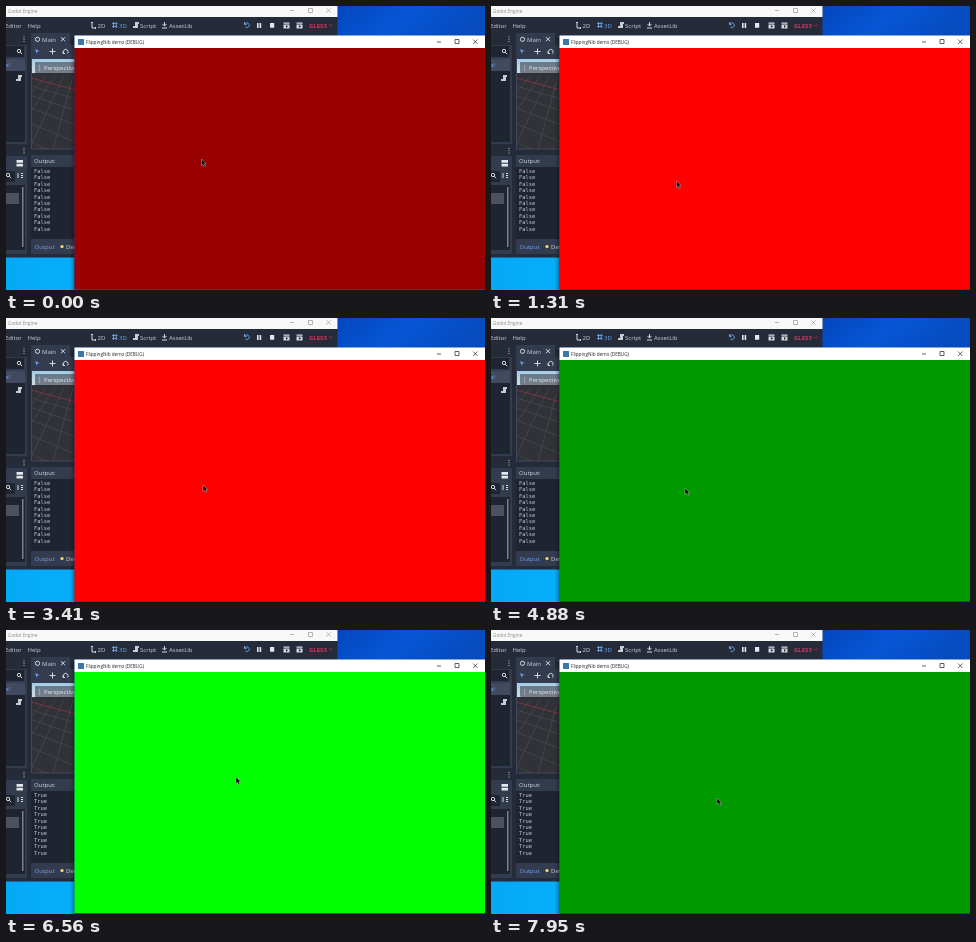
Animation of 479 by 284 pixels, one loop 8 s. Source, as an HTML page:

```html
<!DOCTYPE html>
<html lang="en">
<head>
<meta charset="utf-8">
<title>Pen demo</title>
<style>
html, body { margin: 0; width: 100%; height: 100%; overflow: hidden; background: #0757cf; }
svg { display: block; width: 479px; height: 284px; font: 6px "Noto Sans", sans-serif; fill: #c6cad3; }
.mono { font: 5.4px "DejaVu Sans Mono", monospace; }
.win { font: 4.65px "Open Sans", sans-serif; }
.line { fill: none; stroke: #d4d7de; stroke-width: 1; }
.blue { fill: #699ce8; }
.dark { fill: #1f2530; }
.thin { fill: none; stroke-width: .7; }
</style>
</head>
<body>
<svg viewBox="0 0 479 284">
  <defs>
    <linearGradient id="desk" x2="1" y2=".25">
      <stop stop-color="#0346bd"/><stop offset=".5" stop-color="#0756d5"/><stop offset="1" stop-color="#064bbf"/>
    </linearGradient>
    <linearGradient id="glow"><stop stop-color="#04a9f6"/><stop offset="1" stop-color="#06aefa"/></linearGradient>
    <linearGradient id="sky" x2="0" y2="1"><stop stop-color="#a3cbe6"/><stop offset="1" stop-color="#d3dde3"/></linearGradient>
    <linearGradient id="shade"><stop stop-color="#000" stop-opacity="0"/><stop offset="1" stop-color="#000" stop-opacity=".35"/></linearGradient>
    <clipPath id="view"><rect x="26" y="53" width="43" height="90"/></clipPath>
  </defs>
  <rect x="331" width="148" height="31" fill="url(#desk)"/>
  <rect y="250" width="70" height="34" fill="url(#glow)"/>

  <!-- editor window -->
  <rect width="331.500" height="251.500" fill="#252b38"/>
  <rect width="331.500" height="11" fill="#f8f8f9"/>
  <text class="win" x="2" y="6.600" fill="#888">Godot Engine</text>
  <path class="thin" stroke="#999" d="M284 4.500h4M302.500 2.500h4v4h-4zM320.500 2.500l4 4m0-4l-4 4"/>
  <text x="-1" y="21.500">Editor</text><text x="21.500" y="21.500">Help</text>
  <text x="91.500" y="21.500">2D</text><text class="blue" x="113" y="21.500">3D</text>
  <text x="134" y="21.500">Script</text><text x="163" y="21.500">AssetLib</text>
  <path class="line" d="M86 16v6h4M85 17l1-1 1 1M89 21l1 1-1 1M158.500 16v4M156.500 18l2 2 2-2M156 22h5"/>
  <path class="line" style="stroke:#699ce8" d="M106 17.500h5.500M106 20.500h5.500M107.500 16v6M110.200 16v6"/>
  <path d="M129 16h4v2h-1v4h-5v-2h2z"/>
  <path class="line" style="stroke:#699ce8" d="M239 18a2.300 2.300 0 1 1 .5 3M238.500 16v2.500h2"/>
  <path fill="#e4e6eb" d="M251 17h1.600v5h-1.600zM253.600 17h1.600v5h-1.600zM264 17h4.200v4.800h-4.200z"/>
  <path fill="#d4d7de" d="M277.500 16.500h6v1.200h-6zM277.500 18.400h6v4h-6zM290.500 16.500h6v1.200h-6zM290.500 18.400h6v4h-6z"/>
  <path class="dark" d="M280 19l2 1.400-2 1.400zM293 19l2 1.400-2 1.400z"/>
  <text x="303" y="21.500" fill="#d8365f" font-weight="600">GLES3</text>
  <path class="thin" stroke="#d8365f" d="M323 18.500l1.700 1.700 1.700-1.700"/>

  <!-- side docks -->
  <path fill="#333b4f" d="M0 39h21v99H0zM0 150h21v98H0zM25 27h39v12H25zM25 39h44v14H25zM25 149h44v99H25z"/>
  <path class="dark" d="M0 40h18v11H0zM0 65h19v71H0zM0 165h9v11H0zM0 179h19v65H0zM25 161h44v72H25z"/>
  <rect y="53" width="19" height="12" fill="#414a5e"/>
  <path d="M17.500 30.500h1v1h-1zM17.500 32.800h1v1h-1zM17.500 35.100h1v1h-1zM17.500 142h1v1h-1zM17.500 144.300h1v1h-1zM17.500 146.600h1v1h-1z"/>
  <g class="line"><circle cx="13" cy="45" r="1.700"/><path d="M14.200 46.200l2 2"/>
    <circle cx="2" cy="169" r="1.700"/><path d="M3.200 170.200l2 2M12 167v5M15 167.500h2M15 169.500h2M15 171.500h2"/></g>
  <text class="blue" x="-1" y="60.500">al</text>
  <path d="M12 69h4v2h-1v4h-5v-2h2z"/>
  <path fill="#e4e6eb" d="M10.500 154h6.500v2.800h-6.500zM10.500 157.700h6.500v2.800h-6.500z"/>
  <rect y="187" width="13" height="11" fill="#4c515d"/>
  <rect x="16" y="181" width="1.500" height="60" fill="#7b808b"/>

  <!-- scene view -->
  <circle class="line" cx="31.500" cy="33.300" r="2.100"/>
  <text x="36" y="35.700">Main</text>
  <path class="line" d="M55 31.200l4 4m0-4l-4 4"/>
  <path class="blue" d="M29 43l4.500 2-2 .7-.8 2z"/>
  <path class="line" d="M46.500 42.500v6M43.500 45.500h6M58 47.500a2.400 2.400 0 1 1 3.400 0M57 45.500v2h2"/>
  <g clip-path="url(#view)">
    <rect x="25" y="53" width="44" height="90" fill="#303237"/>
    <rect x="25" y="53" width="44" height="14" fill="url(#sky)"/>
    <path class="thin" id="grid" stroke="#4b4d52"/>
    <path class="thin" stroke="#95383f" d="M25 72l45 12"/>
    <rect x="29" y="56" width="45" height="11" rx="1" fill="#39424f" opacity=".6"/>
    <text x="38" y="63.600" fill="#e0e3e8">Perspective</text>
    <path d="M33 59h1v1h-1zM33 61.300h1v1h-1zM33 63.600h1v1h-1z"/>
  </g>
  <path class="thin" stroke="#4a5570" d="M25.500 53v90H69"/>
  <text x="28" y="157">Output:</text>
  <g class="mono" id="log"></g>
  <text class="blue" x="28.500" y="242.500">Output</text>
  <circle cx="56" cy="240.500" r="1.600" fill="#ffdd65"/>
  <text x="60" y="242.500">Debugger</text>
  <rect x="64" y="32" width="5" height="252" fill="url(#shade)"/>

  <!-- running window -->
  <rect x="68.500" y="29.500" width="410.500" height="254.500" fill="#0b4ba8"/>
  <rect x="68.500" y="29.500" width="410.500" height="12.500" fill="#fff"/>
  <rect x="72" y="33" width="6" height="6" fill="#3f78a8"/>
  <text class="win" x="80" y="37.700" fill="#222">FlippingNib demo (DEBUG)</text>
  <path class="thin" stroke="#222" d="M431 36h4M449 33.500h4v4h-4zM467 33.500l4.500 4.500m0-4.500l-4.500 4.500"/>
  <rect id="stage" x="68.500" y="42" width="410.500" height="241"/>
  <path id="cursor" d="M0 0v6.500l1.500-1.300 1.200 2.500 1.200-.6-1.200-2.300h2z" fill="#050505" stroke="#ccc" stroke-width=".45"/>
</svg>
<script>
const $ = id => document.getElementById(id);
const LOOP = 8000, LINES = 10, PRINT_START = 4950;

// [start, colour]
const colours = [
  [0, "#900"], [450, "#f00"], [1580, "#900"], [2300, "#f00"], [3770, "#900"],
  [4880, "#090"], [6160, "#0f0"], [6900, "#090"], [7250, "#0f0"], [7750, "#090"]
];
// [time, x, y]
const path = [
  [0, 195.5, 153], [450, 191, 164], [860, 188, 170], [1310, 185.5, 175],
  [1670, 192, 179], [2030, 201, 177], [2480, 190, 182], [2700, 176, 165],
  [2900, 201, 137], [3100, 238, 155], [3250, 222, 186], [3410, 197, 167],
  [4040, 203, 172], [4879, 203, 172], [4880, 194, 170], [5670, 212, 162],
  [6160, 222, 153], [6560, 230, 147], [7250, 231, 160], [7950, 226, 168], [8000, 226, 168]
];

let grid = "";
for (let i = 0; i < 6; i++) {
  grid += `M25 ${80 + i * 8 + i * i * 1.5}l45 ${13 + i * 2}M${40 + i * 9} 70L${i * 24 - 25} 143`;
}
$("grid").setAttribute("d", grid);

const rows = Array.from({ length: LINES }, (_, i) => {
  const row = document.createElementNS("http://www.w3.org/2000/svg", "text");
  row.setAttribute("x", 28);
  row.setAttribute("y", 167 + i * 6.4);
  return $("log").appendChild(row);
});

function cursorAt(t) {
  const i = path.findIndex(p => p[0] > t);
  const [a, b] = [path[i - 1], path[i]];
  const k = (t - a[0]) / (b[0] - a[0]);
  return [1, 2].map(n => a[n] + (b[n] - a[n]) * k);
}

function draw(now) {
  const t = now % LOOP;
  $("stage").setAttribute("fill", colours.findLast(c => c[0] <= t)[1]);
  $("cursor").setAttribute("transform", `translate(${cursorAt(t)})`);
  const printed = Math.floor((t - PRINT_START) / 17);
  rows.forEach((row, i) => row.textContent = i >= LINES - printed ? "True" : "False");
  requestAnimationFrame(() => draw(performance.now()));
}
draw(0);
</script>
</body>
</html>
```
